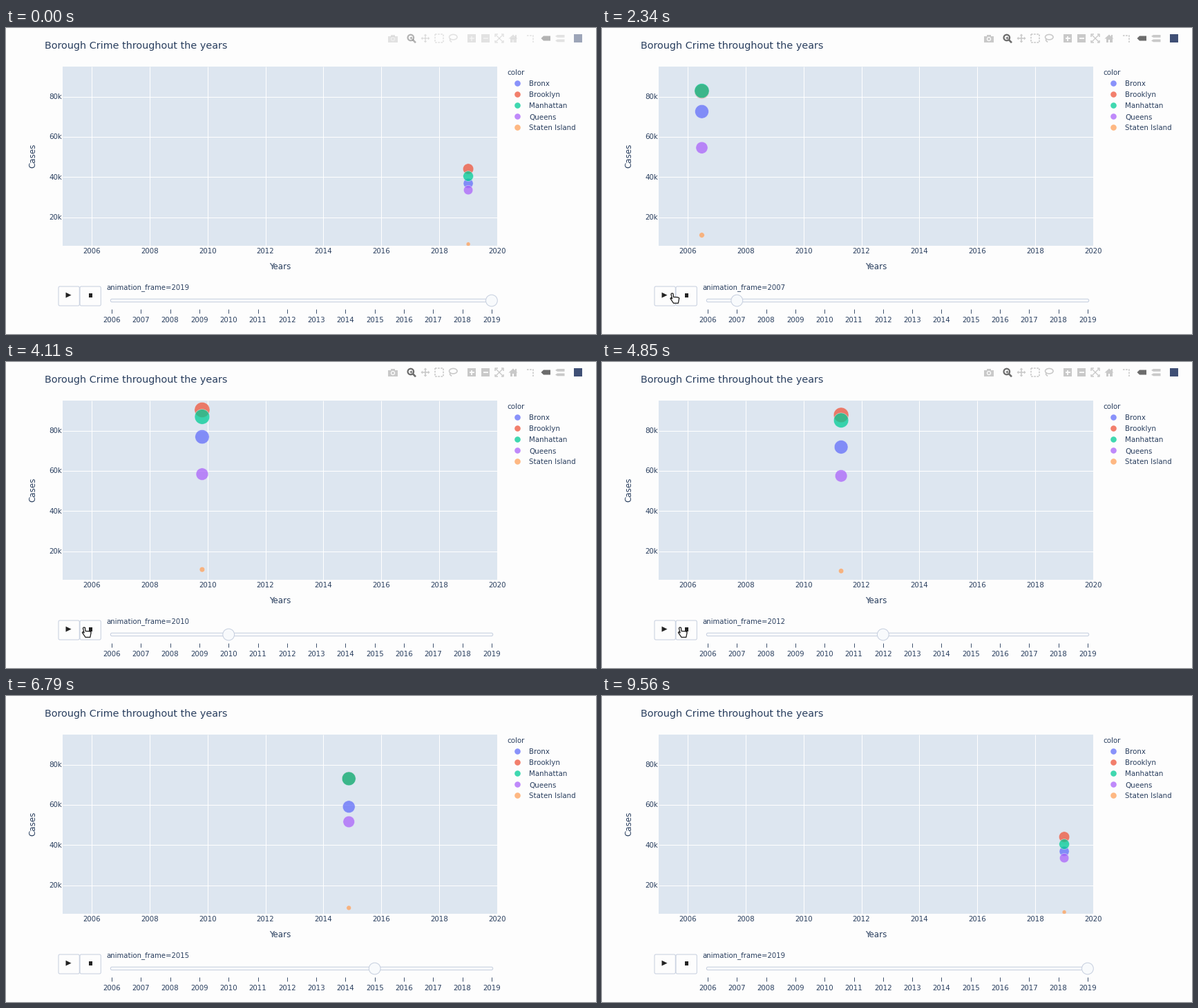
Recreate the animation shown at these times as a matplotlib script. Size 854 by 444 pixels, loop 9590 ms.

```python
import numpy as np
import matplotlib.pyplot as plt
from matplotlib.animation import FuncAnimation
from matplotlib.collections import LineCollection
from matplotlib.patches import Circle, Ellipse, FancyBboxPatch, Polygon, Rectangle

W, H, DPI = 854, 444, 64
STEP, COUNT = 35, 274  # 9590 ms per loop

PAGE, PLOT, INK = "#fdfdfd", "#dde6f0", "#2a3f5f"
BORDER, PALE = "#c6cfdf", "#f8fafc"
FADED, STRONG, LOGO = "#c9c9c9", "#6c6c6c", "#3f4f75"

YEARS = np.arange(2006, 2020)
LAST = len(YEARS) - 1

# Thousands of cases in the turning-point years
TURNS = [2008, 2010, 2014, 2015, 2019]
BOROUGHS = {
    "Bronx": ("#636efa", [76.6, 76.9, 61.2, 58.7, 36.8]),
    "Brooklyn": ("#ef553b", [87.2, 90.6, 81.8, 71.8, 44.0]),
    "Manhattan": ("#00cc96", [87.5, 86.8, 81.5, 71.8, 40.4]),
    "Queens": ("#ab63fa", [57.6, 58.4, 55.5, 51.0, 33.5]),
    "Staten Island": ("#ffa15a", [11.7, 10.8, 8.8, 8.7, 6.6]),
}
COLORS = [color for color, _ in BOROUGHS.values()]
CASES = np.column_stack([np.interp(YEARS, [2006, *TURNS], [0.93 * v[0], *v])
                         for _, v in BOROUGHS.values()])
# Playback speed drifts a little, so the steps are paced between a few marks
STARTS = np.interp(YEARS, [2006, 2010, 2013, 2015, 2019],
                   [1540, 3703, 5193, 6366, 8550])

plt.rcParams["font.family"] = "DejaVu Sans"
fig = plt.figure(figsize=(W / DPI, H / DPI), dpi=DPI, facecolor=PAGE)
ax = fig.add_axes([0, 0, 1, 1])
ax.set(xlim=(0, W), ylim=(H, 0))
ax.axis("off")


def pt(px):
    return px * 72 / DPI


def year_x(year):
    return 124 + (year - 2006) * 41.93


def cases_y(thousands):
    return 99.5 + (80 - thousands) * 2.917


def slider_x(index):
    return 153 + index * 42.3


def text(x, y, s, size=10.25, ha="left", **kw):
    return ax.text(x, y, s, fontsize=pt(size), color=INK, ha=ha,
                   va=kw.pop("va", "baseline"), **kw)


def add(patch):
    return ax.add_patch(patch)


def rounded(x, y, w, h, r, fc):
    style = f"round,pad=0,rounding_size={r}"
    add(FancyBboxPatch((x, y), w, h, boxstyle=style, fc=fc, ec=BORDER, lw=pt(1)))


def lines(segments, color, width):
    ax.add_collection(LineCollection(segments, colors=color, linewidths=pt(width)))


def smooth(p):
    return p * p * (3 - 2 * p)


def cubic_in_out(p):
    return 4 * p ** 3 if p < 0.5 else 1 - 4 * (1 - p) ** 3


# Chart background, grid and labels
area = add(Rectangle((82, 55.5), 629, 260, fc=PLOT, ec="none"))
lines([[(year_x(y), 55.5), (year_x(y), 315.5)] for y in range(2006, 2020, 2)], "white", 1)
lines([[(82, cases_y(v)), (711, cases_y(v))] for v in range(20, 81, 20)], "white", 1)

text(56.5, 30, "Borough Crime throughout the years", 14.37)
for year in range(2006, 2021, 2):
    text(year_x(year), 327, str(year), ha="center")
for v in range(20, 81, 20):
    text(81, cases_y(v) + 3.6, f"{v}k", ha="right")
text(396.5, 350, "Years", 11.9, ha="center")
text(38.5, 185, "Cases", 11.9, ha="center", va="center", rotation=90)

text(725.5, 68.5, "color")
for i, (name, color) in enumerate(zip(BOROUGHS, COLORS)):
    y = 80.5 + 16 * i
    add(Circle((740.5, y), 4.3, fc=color, ec="none", alpha=0.75))
    text(757, y + 4, name)

# Buttons and slider
for x in (76, 107):
    rounded(x, 375, 30.3, 28, 2, PAGE)
add(Polygon([(86.5, 383.7), (94.5, 387.6), (86.5, 391.5)], fc="#222", ec="none"))
add(Rectangle((119.5, 385.3), 5.5, 5.5, fc="#222", ec="none"))

rounded(151.3, 393.2, 553.4, 4.4, 2.1, PALE)
lines([[(slider_x(i), 408), (slider_x(i), 414)] for i in range(LAST + 1)], INK, 0.9)
for i, year in enumerate(YEARS):
    text(slider_x(i), 427, str(year), ha="center")
status = text(145, 379.2, "", 10.15)
handle = add(Circle((0, 395.5), 8.4, fc=PALE, ec=BORDER, lw=pt(1), zorder=4))

# Toolbar that fades with the pointer
toolbar = []


def fill(points, color=FADED):
    toolbar.append(add(Polygon(points, fc=color, ec="none")))


def box(x, y, w, h, color=FADED):
    fill([(x, y), (x + w, y), (x + w, y + h), (x, y + h)], color)


def stroke(points, color=FADED, width=1.6, style="-"):
    toolbar.extend(ax.plot(*zip(*points), color=color, lw=pt(width), ls=style,
                           solid_capstyle="butt", dash_capstyle="butt"))


def ring(x, y, w, h, color=FADED, width=1.6):
    toolbar.append(add(Ellipse((x, y), w, h, fc="none", ec=color, lw=pt(width))))


def cross(x, y, r, color, width):
    stroke([(x - r, y), (x + r, y)], color, width)
    stroke([(x, y - r), (x, y + r)], color, width)


def draw_toolbar():
    dashes = (0, (1.6, 1))
    # camera and magnifier
    box(553, 11.5, 14, 9)
    box(557, 9.5, 6, 3)
    ring(560, 16, 5, 5, PAGE, 1.3)
    ring(585.8, 14, 8.5, 8.5, STRONG, 2.2)
    stroke([(588.5, 16.8), (593, 21.3)], STRONG, 2.6)
    cross(585.8, 14, 2.2, STRONG, 1.2)
    # pan, box and lasso selection
    cross(607, 15, 5, FADED, 1.6)
    for angle in np.arange(4) * np.pi / 2:
        tip = angle + np.array([0, 0.55, -0.55])
        reach = np.array([6.5, 4.6, 4.6])
        fill(np.column_stack([607 + reach * np.cos(tip), 15 + reach * np.sin(tip)]))
    stroke([(621, 9), (633, 9), (633, 21), (621, 21), (621, 9)], style=dashes)
    ring(647.3, 13.2, 11.5, 7.5)
    stroke([(643, 15.5), (642.5, 18), (645, 20.5)])
    # zoom in and out
    box(668, 9, 12, 12)
    cross(674, 15, 3.5, PAGE, 1.8)
    box(688, 9, 12, 12)
    stroke([(690.5, 15), (697.5, 15)], PAGE, 1.8)
    # autoscale and home
    for sx in (-1, 1):
        for sy in (-1, 1):
            stroke([(714, 15), (714 + 5 * sx, 15 + 5 * sy)], width=1.3)
            stroke([(714 + 2.5 * sx, 15 + 6 * sy), (714 + 6 * sx, 15 + 6 * sy),
                    (714 + 6 * sx, 15 + 2.5 * sy)], width=1.5)
    fill([(727.5, 15.5), (734, 9.5), (740.5, 15.5)])
    box(729.5, 15, 9, 5.5)
    box(732.8, 17, 2.4, 3.5, PAGE)
    box(737, 10, 1.6, 3.5)
    # spike lines, hover tags and logo stand-in
    stroke([(754, 11), (763, 11), (763, 21)], style=dashes)
    fill([(774.5, 15), (778, 11.5), (788, 11.5), (788, 18.5), (778, 18.5)], STRONG)
    for y in (10, 16.5):
        fill([(795, y + 1.9), (798, y), (808.5, y), (808.5, y + 3.8), (798, y + 3.8)])
    box(822, 9, 12, 12, LOGO)


draw_toolbar()

# Data bubbles
bubbles = ax.scatter(np.zeros(5), np.zeros(5), s=np.ones(5), c=COLORS, alpha=0.75,
                     edgecolors="#e5ecf6", linewidths=pt(0.6), zorder=3)
bubbles.set_clip_path(area)

# Pointer
HAND = np.array([(-4.5, -7), (-2.6, -6.6), (-2, -1.5), (4.2, -1.2), (6.2, 0),
                 (4.8, 7.4), (-2, 7.4), (-6.6, 0.6), (-5.6, -0.6), (-4, 1),
                 (-5.6, -5.8)])
ARROW = np.array([(0, 0), (0, 13), (3, 10.3), (5, 15), (7, 14.2), (5, 9.6), (9, 9.4)])
pointer = add(Polygon(HAND, fc="white", ec="#222", lw=pt(1.3),
                      joinstyle="round", zorder=6))
# Each glide: start time, end time, destination
ENTRY = np.array([300, 452])
GLIDES = [(150, 1250, (88, 387.5)), (1700, 2500, (108, 392.5)),
          (3350, 3900, (117, 392)), (5600, 5850, (140, 462))]


def pointer_at(t):
    place = ENTRY
    for start, end, goal in GLIDES:
        p = smooth(np.clip((t - start) / (end - start), 0, 1))
        place = place * (1 - p) + np.array(goal) * p
    return place


def transition(t, duration):
    """Index of the active year and progress towards it."""
    k = int(np.searchsorted(STARTS, t, side="right")) - 1
    if k < 0:
        return LAST, 1.0
    return k, min((t - STARTS[k]) / duration, 1.0)


def mix(values, k, p):
    # index -1 wraps, so the first year is reached from the last
    return values[k - 1] * (1 - p) + values[k] * p


def update(frame):
    t = frame * STEP + 15

    k, p = transition(t, 500)
    cases = mix(CASES, k, p)
    bubbles.set_offsets(np.column_stack(
        [np.full(5, year_x(mix(YEARS, k, p))), cases_y(cases)]))
    bubbles.set_sizes(pt(2.33 * np.sqrt(cases)) ** 2)

    k, p = transition(t + 20, 150)
    handle.center = (slider_x(mix(np.arange(LAST + 1), k, cubic_in_out(p))), 395.5)
    status.set_text(f"animation_frame={YEARS[k]}")

    opacity = float(np.interp(t, [0, 150, 5850, 6150], [0.45, 1, 1, 0]))
    for item in toolbar:
        item.set_alpha(opacity)
        item.set_visible(opacity > 0)

    x, y = pointer_at(t)
    over_button = 76 < x < 138 and 375 < y < 404
    pointer.set_xy((HAND if over_button else ARROW) + (x, y))
    return [bubbles, handle, status, pointer, *toolbar]


anim = FuncAnimation(fig, update, frames=COUNT, interval=STEP, repeat=True,
                     repeat_delay=0, blit=False)
plt.show()
```
